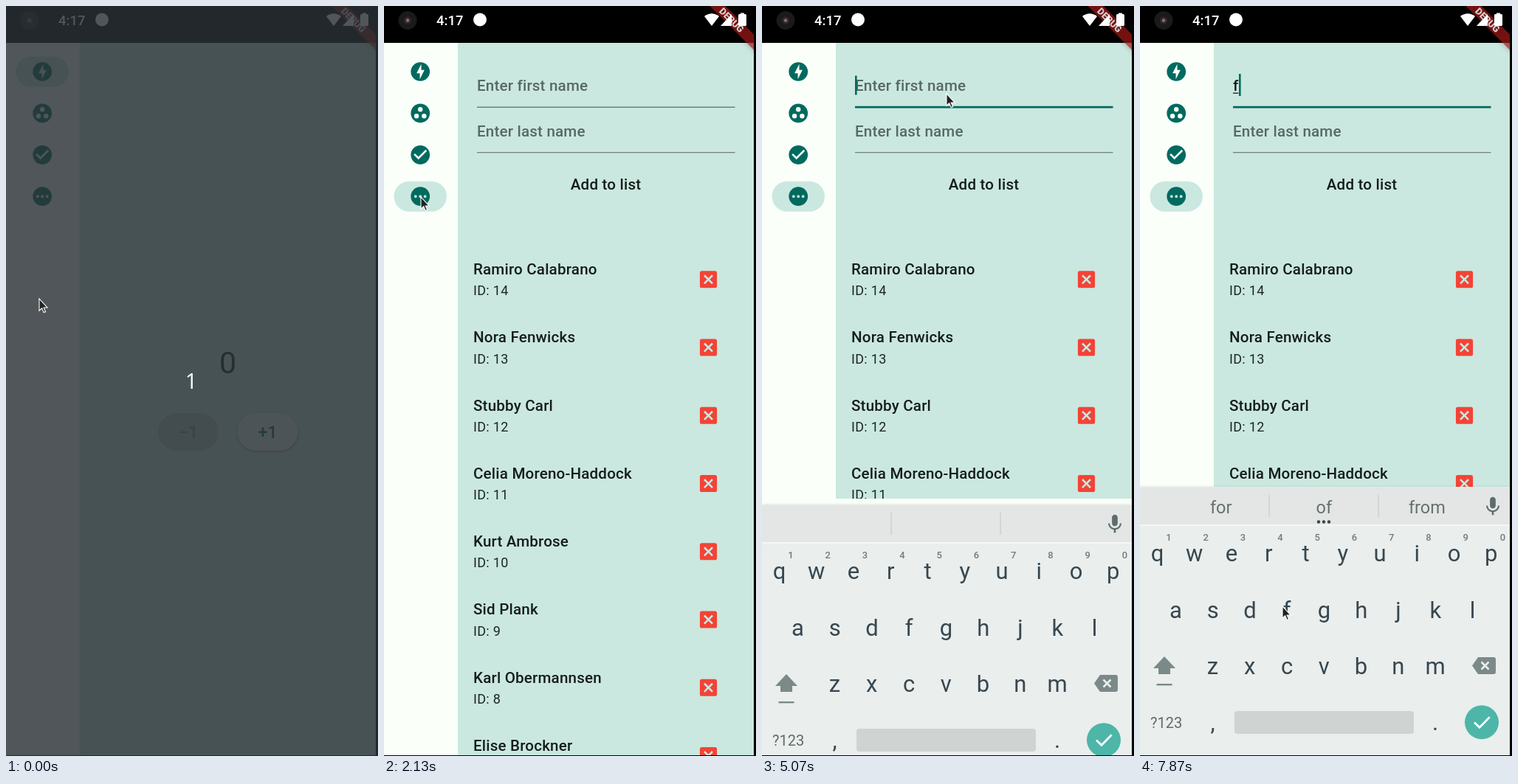
Animation, 504 px wide and 1017 px high, one loop 8 s. Source, as an HTML page with a canvas:

```html
<!DOCTYPE html>
<html lang="en">
<head>
<meta charset="utf-8">
<title>Contact list demo</title>
<style>
html, body { margin: 0; width: 100%; height: 100%; overflow: hidden; background: #000; }
canvas { display: block; }
</style>
</head>
<body>
<canvas id="stage" width="504" height="1017"></canvas>
<script>
const g = document.getElementById('stage').getContext('2d');
const LOOP = 8000, TICK = 1000 / 15, DP = 504 / 392;
const TEAL = '#006a5f', RAIL = '#fafff9', PAGE = '#cae8df', INK = '#161d1b', KEY = '#37474f';
const FONT = 'Roboto, "Noto Sans", sans-serif';
const BODY = 16 * DP, SPACING = 0.15 * DP;

const dot = (x, y, r) => `M${x - r} ${y}a${r} ${r} 0 1 0 ${2 * r} 0a${r} ${r} 0 1 0 ${-2 * r} 0z`;
const disc = dot(12, 12, 10);
const ICONS = [
  disc + 'M11.48 20v-6.26H8L13 4v6.26h3.35z',
  disc + dot(12, 8, 2.5) + dot(8, 15, 2.5) + dot(16, 15, 2.5),
  disc + 'M10 17l-5-5 1.41-1.41L10 14.17l7.59-7.59L19 8z',
  disc + dot(7, 12, 1.5) + dot(12, 12, 1.5) + dot(17, 12, 1.5)
].map(d => new Path2D(d));
const REMOVE = new Path2D('M5 3h14a2 2 0 0 1 2 2v14a2 2 0 0 1-2 2H5a2 2 0 0 1-2-2V5a2 2 0 0 1 2-2z' +
  'M17 15.59L15.59 17 12 13.41 8.41 17 7 15.59 10.59 12 7 8.41 8.41 7 12 10.59 15.59 7 17 8.41 13.41 12z');
const MIC = new Path2D('M12 14c1.66 0 3-1.34 3-3V5c0-1.66-1.34-3-3-3S9 3.34 9 5v6c0 1.66 1.34 3 3 3z' +
  'm5.3-3c0 3-2.54 5.1-5.3 5.1S6.7 14 6.7 11H5c0 3.41 2.72 6.23 6 6.72V21h2v-3.28c3.28-.48 6-3.3 6-6.72z');
const SHIFT = new Path2D('M33 882L48 898H41V906H25V898H18z');
const ERASE = new Path2D('M458 883H479Q482 883 482 886V903Q482 906 479 906H458L450 894.5z');
const POINTER = new Path2D('M0 0V16.2L3.7 12.8 6.2 18.6 8.6 17.6 6.2 12H11z');

const PEOPLE = ['Ramiro Calabrano', 'Nora Fenwicks', 'Stubby Carl', 'Celia Moreno-Haddock',
  'Kurt Ambrose', 'Sid Plank', 'Karl Obermannsen', 'Elise Brockner'];

// Pointer moves: first tick, last tick, start, bend, end
const MOVES = [
  [6, 16, 45, 397, 82, 300, 50, 259],
  [49, 63, 50, 259, 150, 195, 250, 119],
  [82, 95, 250, 119, 320, 480, 395, 817],
  [95, 111, 395, 817, 560, 850, 193, 814]
];

const clamp = v => Math.max(0, Math.min(1, v));

function box(x, y, w, h, color, r = 0) {
  g.fillStyle = color;
  g.beginPath();
  g.roundRect(x, y, w, h, r);
  g.fill();
}

function circle(x, y, r, color) {
  box(x - r, y - r, 2 * r, 2 * r, color, r);
}

function shape(points, color) {
  g.fillStyle = color;
  g.fill(new Path2D(points));
}

function stroke(points, color, width) {
  g.strokeStyle = color;
  g.lineWidth = width;
  g.stroke(new Path2D(points));
}

function text(s, x, y, size, color, weight = 400, align = 'left', spacing = 0) {
  g.font = `${weight} ${size}px ${FONT}`;
  g.letterSpacing = spacing + 'px';
  g.textAlign = align;
  g.fillStyle = color;
  g.fillText(s, x, y);
}

function icon(path, x, y, color) {
  g.save();
  g.translate(x - 12 * DP, y - 12 * DP);
  g.scale(DP, DP);
  g.fillStyle = color;
  g.fill(path, 'evenodd');
  g.restore();
}

function statusBar() {
  circle(32, 19.5, 12.5, '#1b1a1a');
  circle(32, 19.5, 5, '#30282a');
  circle(32, 19.5, 2.2, '#8a6f6a');
  text('4:17', 71, 26, 18.5, '#fff', 500);
  circle(130, 18.5, 9, '#fff');
}

function debugBanner() {
  g.save();
  g.beginPath();
  g.rect(0, 0, 501, 1017);
  g.clip();
  g.translate(471, 19);
  g.rotate(Math.PI / 4);
  g.shadowColor = 'rgba(0,0,0,.45)';
  g.shadowBlur = 7;
  box(-70, -7.5, 140, 15, 'rgba(183,28,28,.63)');
  g.shadowColor = 'transparent';
  text('DEBUG', 0, 4.6, 12.8, '#d8cfcf', 900, 'center');
  g.restore();
  shape('M434 14Q444 6.5 454 14L444 27z', '#fff');
  shape('M456 27L471 11V27z', '#fff');
  box(480, 11, 11, 16, '#fff', 1.5);
  box(483, 9.5, 5, 3, '#fff');
}

function pill(y, k) {
  const w = 71.5 * (0.4 + 0.6 * k);
  g.globalAlpha = k;
  box(49.2 - w / 2, y - 20.5, w, 41, PAGE, 20.5);
  g.globalAlpha = 1;
}

function rail(n) {
  const k = clamp((n - 21) / 5);
  pill(89, 1 - k);
  pill(258.2, k);
  ICONS.forEach((p, i) => icon(p, 49.2, 89 + 56.4 * i, TEAL));
}

function counter() {
  text('0', 300.5, 498, 32 * DP, INK, 400, 'center');
  box(206, 552, 82, 51, '#b2ccc4', 25.5);
  text('\u22121', 247, 585.5, 18 * DP, '#7d918b', 500, 'center');
  g.shadowColor = 'rgba(0,0,0,.35)';
  g.shadowBlur = 3;
  g.shadowOffsetY = 1.3;
  box(313.5, 552, 82, 51, '#ebf4ef', 25.5);
  g.shadowColor = 'transparent';
  g.shadowOffsetY = 0;
  text('+1', 354.5, 585.5, 18 * DP, TEAL, 500, 'center');
}

function form(n) {
  const focused = n >= 74, typed = n >= 116;
  const hint = '#586864';
  g.globalAlpha = typed ? clamp((118 - n) / 3) : 1;
  text('Enter first name', 126, 115, BODY, hint, 500, 'left', SPACING);
  g.globalAlpha = 1;
  text('Enter last name', 126, 176.6, BODY, hint, 500, 'left', SPACING);
  if (focused) box(126, 135.8, 349.5, 2.6, TEAL);
  else box(126, 136.6, 349.5, 1.3, '#6f7f7a');
  box(126, 198, 349.5, 1.3, '#6f7f7a');
  if (typed) {
    text('f', 126, 115, BODY, INK, 500);
    box(126, 117.5, 7.5, 1.3, INK);
  }
  const hidden = n >= 92 && n < 114 && (n - 92) % 15 < 7;
  if (focused && !hidden) box(typed ? 134 : 126, typed ? 92 : 94.5, 2.6, typed ? 30 : 26, TEAL);
  text('Add to list', 300.5, 249, BODY, INK, 500, 'center', SPACING);
}

function people() {
  PEOPLE.forEach((name, i) => {
    const y = 92.25 * i;
    text(name, 121, 364 + y, BODY, INK, 500, 'left', SPACING);
    text('ID: ' + (14 - i), 121, 392.3 + y, 14 * DP, '#1d2623', 400, 'left', 0.25 * DP);
    icon(REMOVE, 439.5, 370.8 + y, '#f44336');
  });
}

function keyRow(letters, x, y) {
  [...letters].forEach((c, i) => text(c, x + 50.25 * i, y, 31, KEY, 400, 'center'));
}

function keyboard(n, drop) {
  g.save();
  g.translate(0, drop);
  g.shadowColor = 'rgba(0,0,0,.2)';
  g.shadowBlur = 4;
  box(0, 653, 501, 364, '#eaeeed');
  g.shadowColor = 'transparent';
  box(0, 653, 501, 50, '#e3e6e5');
  box(0, 703, 501, 2, '#f3f6f5');
  box(174.5, 663, 1.2, 30, '#c6cac9');
  box(322.5, 663, 1.2, 30, '#c6cac9');
  icon(MIC, 478, 678.7, '#5f6c6c');
  if (n >= 117) {
    ['for', 'of', 'from'].forEach((w, i) => text(w, 109.7 + 139.6 * i, 688, 23.5, '#66716f', 400, 'center'));
    for (const x of [242, 249, 256]) circle(x, 699.5, 2.2, KEY);
  }

  keyRow('qwertyuiop', 23.5, 752.5);
  keyRow('asdfghjkl', 48.5, 829.5);
  keyRow('zxcvbnm', 98.5, 906);
  [...'1234567890'].forEach((c, i) => text(c, 39 + 50.28 * i, 725, 13, '#707c7c', 500, 'center'));

  g.fillStyle = '#7b8a88';
  g.fill(SHIFT);
  box(22.5, 919, 21, 2.4, '#7b8a88');
  g.fillStyle = '#7b8a88';
  g.fill(ERASE);
  stroke('M462.5 889.5l10 10m0-10l-10 10', '#eaeeed', 2.5);

  text('?123', 14, 979, 20, '#5f6c6c');
  text(',', 98.5, 982, 31, KEY, 400, 'center');
  text('.', 400, 982, 31, KEY, 400, 'center');
  box(128, 956, 243, 31, '#cfd4d3', 4);
  circle(463, 971.3, 23, '#4db6a8');
  stroke('M453 971.5L460 978.3 473.7 964.3', '#fff', 2.7);

  if (n === 114 || n === 115) {
    box(173, 733, 52, 116, '#f8faf9', 8);
    text('f', 199, 776, 36, KEY, 400, 'center');
  }
  g.restore();
}

function pointer(n) {
  const [from, to, x0, y0, cx, cy, x1, y1] = MOVES.findLast(m => n >= m[0]) || MOVES[0];
  const p = clamp((n - from) / (to - from));
  const e = p ** 3 * (6 * p * p - 15 * p + 10);
  const bend = (a, b, c) => a * (1 - e) ** 2 + 2 * b * e * (1 - e) + c * e * e;
  g.save();
  g.translate(bend(x0, cx, x1), bend(y0, cy, y1));
  g.fillStyle = '#222';
  g.fill(POINTER);
  g.strokeStyle = '#fff';
  g.lineWidth = 1.1;
  g.stroke(POINTER);
  g.restore();
}

function draw(n) {
  const drop = [365, 130, 24, 6, 1][n - 74] ?? 0;
  const bottom = n < 75 ? 1016 : 652 + drop * 2 / 3;
  box(0, 0, 504, 1017, '#000');
  box(0, 50, 501, 966, RAIL);
  rail(n);

  g.save();
  g.beginPath();
  g.rect(100, 50, 401, bottom - 50);
  g.clip();
  box(100, 50, 401, 966, PAGE);
  if (n < 23) counter();
  if (n >= 32) {
    form(n);
    people();
  }
  g.restore();

  statusBar();
  debugBanner();
  if (n >= 75) keyboard(n, drop);
  box(501, 60, 3, 957, '#000');
  box(0, 1016, 504, 1, '#000');

  if (n < 1) {
    box(0, 0, 504, 1017, 'rgba(43,49,54,.82)');
    g.font = '29px "Open Sans", sans-serif';
    g.letterSpacing = '0px';
    g.textAlign = 'center';
    g.fillStyle = '#fff';
    g.fillText('1', 251, 519);
  }
  pointer(n);
}

const start = performance.now();
function frame() {
  const t = (performance.now() - start) % LOOP;
  draw(Math.floor((t + 5) / TICK));
  requestAnimationFrame(frame);
}
frame();
</script>
</body>
</html>
```
